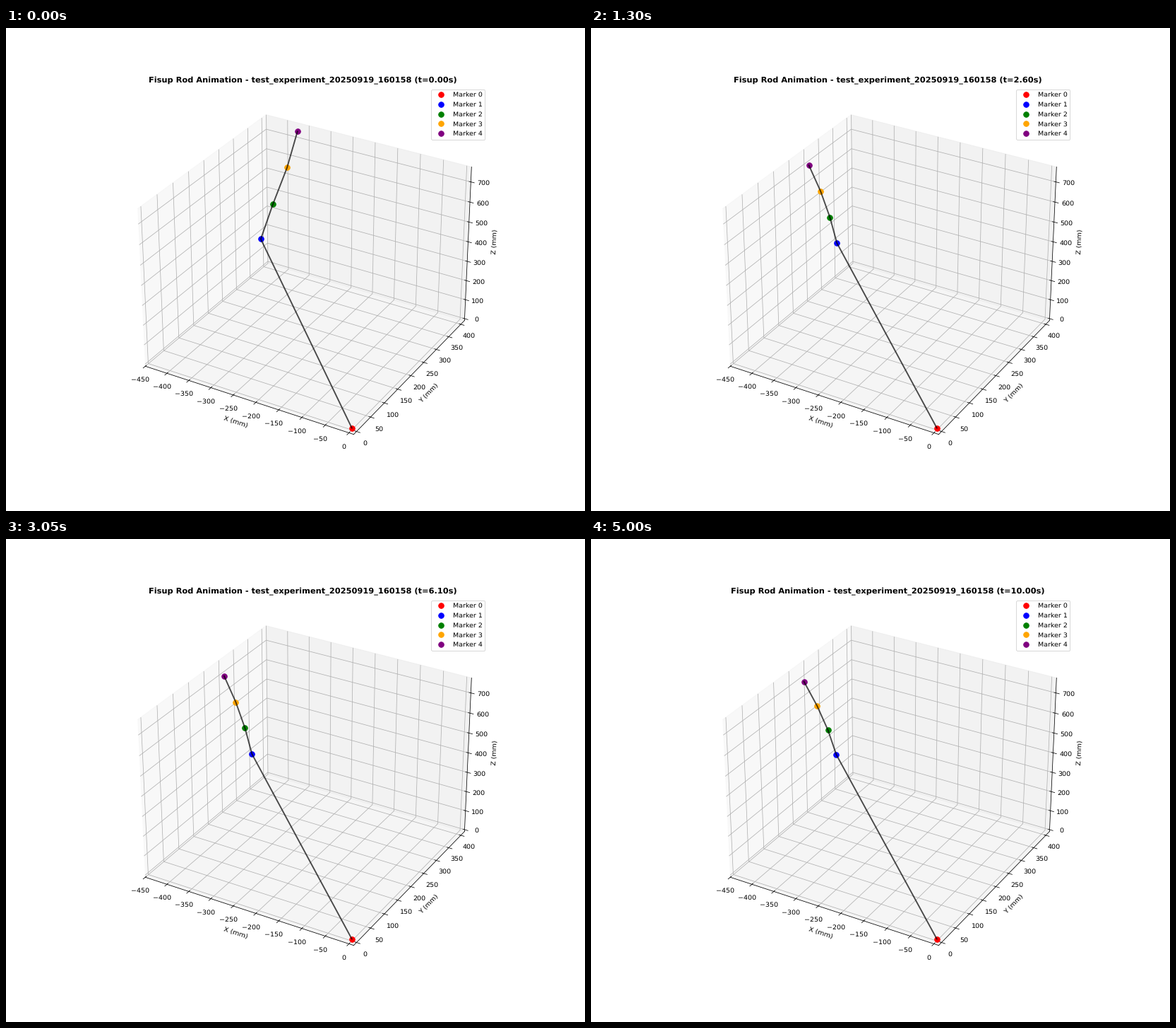
A matplotlib script for the animation above (5050 ms loop, 820x683 px).

```python
import numpy as np
import matplotlib.pyplot as plt
from matplotlib.animation import FuncAnimation

plt.rcParams["text.hinting"] = "none"

W, H = 820, 683
DPI = W / 12
FRAMES, STEP_MS = 101, 50
DEPTH = 200  # mm along Y for the swinging markers

COLORS = ["red", "blue", "green", "orange", "purple"]

# Markers 1 to 4 along the bending part of the rod, in screen pixels
U = np.linspace(0, 1, 4)
REST_X = 348 - 27 * U - 15 * U**2
REST_Y = 304.5 - 107.5 * U
FLEX = np.array([0.12, 0.38, 0.7, 1])


def sway(t):
    """Sideways shift of the tip: a damped swing, wider to the right."""
    amp = 56 * np.exp(-0.21 * t) + 31.2 * np.exp(-2.5 * t)
    wander = 0.065 * np.cos(2 * np.pi * (t - 2.2) / 6.6)
    c = np.cos(2 * np.pi * (1.88 * max(t - 0.1, 0) + wander))
    return amp * (1.125 * c + 0.125 * abs(c))


def swing_shape(t):
    """Screen points of the bent rod; the tip rises as it swings right."""
    d = sway(t)
    rise = 52 * np.tanh(d / 50)
    return np.column_stack([REST_X + FLEX * d, REST_Y - FLEX * rise])


def lift(points):
    """Screen points to data coordinates on the plane y = DEPTH."""
    m = ax.get_proj()
    flat = ax.transData.inverted().transform([(x, H - y) for x, y in points])
    out = []
    for a, b in flat:
        rows = np.array([m[0] - a * m[3], m[1] - b * m[3]])
        x, z = np.linalg.solve(rows[:, [0, 2]], -(rows[:, 1] * DEPTH + rows[:, 3]))
        out.append((x, DEPTH, z))
    return np.array(out)


fig = plt.figure(figsize=(W / DPI, H / DPI), dpi=DPI)
ax = fig.add_subplot(111, projection="3d")
ax.set_xlim(-450.5, 10)
ax.set_ylim(-10, 415.5)
ax.set_zlim(-10, 773.5)
ax.set_xlabel("X (mm)")
ax.set_ylabel("Y (mm)")
ax.set_zlabel("Z (mm)")
title = ax.set_title("", fontsize=12, fontweight="bold")

markers = [
    ax.plot([0], [0], [0], "o", color=c, markersize=8, label=f"Marker {i}")[0]
    for i, c in enumerate(COLORS)
]
rod, = ax.plot([0], [0], [0], "k-", linewidth=2, alpha=0.7)
ax.legend(loc="upper right", labelspacing=0.53)
ax.apply_aspect()


def update(i):
    t = i * 0.1
    pts = np.vstack([np.zeros(3), lift(swing_shape(t))])
    for marker, (x, y, z) in zip(markers, pts):
        marker.set_data_3d([x], [y], [z])
    rod.set_data_3d(*pts.T)
    title.set_text(f"Fisup Rod Animation - test_experiment_20250919_160158 (t={t:.2f}s)")
    return [*markers, rod, title]


anim = FuncAnimation(fig, update, frames=FRAMES, interval=STEP_MS,
                     init_func=lambda: update(0), blit=False, repeat=True)
plt.show()
```
